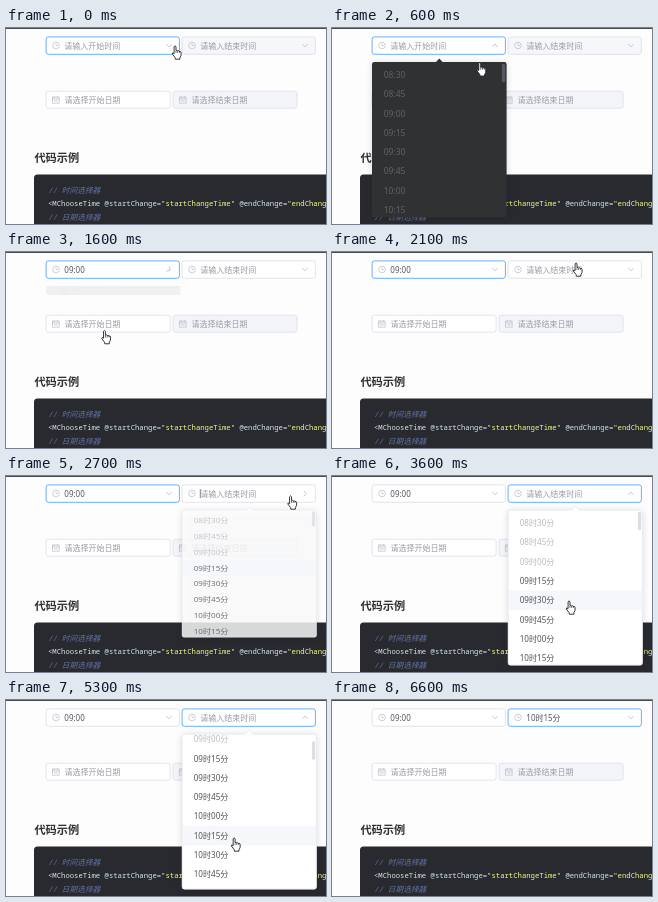
An HTML page with a canvas that plays this animation: 320x196 px, repeating every 6700 ms.

```html
<!DOCTYPE html>
<html lang="zh-CN">
<head>
<meta charset="utf-8">
<title>时间选择</title>
<style>
html, body { margin: 0; width: 100%; height: 100%; overflow: hidden; background: #fdfdfe; }
canvas { display: block; width: 320px; height: 196px; }
</style>
</head>
<body>
<canvas id="stage"></canvas>
<script>
const W = 320, H = 196, LOOP = 6700, STEP = 100;
const SANS = '"Noto Sans", "Noto Sans CJK SC", "Noto Sans CJK", sans-serif';
const MONO = '"Noto Sans Mono", "Noto Sans CJK SC", "Noto Sans CJK", monospace';
const BLUE = [64, 158, 255], GREY = [220, 223, 230];
const TEXT = '#606266', STRONG = '#535559', HINT = '#999ca2', FAINT = '#b9bcc4';
const ROW = 19.3, TOP = 33.9, BOTTOM = 189.3, BOX_W = 134.6;

const canvas = document.getElementById('stage');
const ctx = canvas.getContext('2d');
const dpr = window.devicePixelRatio || 1;
canvas.width = W * dpr;
canvas.height = H * dpr;

const clamp = v => Math.max(0, Math.min(1, v));
const span = (t, from, to) => clamp((t - from) / (to - from));
const quintOut = p => 1 - (1 - p) ** 5;
const quadOut = p => 1 - (1 - p) ** 2;
const smooth = p => p * p * (3 - 2 * p);
const mix = (a, b, p) => `rgb(${a.map((v, i) => Math.round(v + (b[i] - v) * p))})`;

// Pointer stops: time, left, top
const stops = [
  [0, 165.5, 17], [400, 165.5, 17], [1000, 83.3, 82], [1100, 83.3, 83],
  [1500, 83.3, 83], [2100, 240.5, 10], [2200, 240.5, 10], [2700, 281, 19],
  [2850, 281, 19], [3500, 233.5, 124], [3600, 233.5, 124], [4200, 232.5, 133],
  [4750, 232.5, 133], [5200, 224.6, 137], [5400, 224.6, 137], [6100, 216, 198],
  [LOOP, 216, 198]
];

function pointerAt(t) {
  const i = stops.findIndex(s => s[0] > t);
  const [t0, x0, y0] = stops[i - 1], [t1, x1, y1] = stops[i];
  const p = smooth(span(t, t0, t1));
  return { x: x0 + (x1 - x0) * p, y: y0 + (y1 - y0) * p };
}

function text(str, x, y, color, size = 8, font = SANS, style = '') {
  ctx.font = `${style} ${size}px ${font}`;
  ctx.fillStyle = color;
  ctx.fillText(str, x, y);
}

function roundRect(x, y, w, h, r, fill, stroke) {
  ctx.beginPath();
  ctx.roundRect(x, y, w, h, r);
  if (fill) { ctx.fillStyle = fill; ctx.fill(); }
  if (stroke) { ctx.strokeStyle = stroke; ctx.lineWidth = 0.8; ctx.stroke(); }
}

function line(points, color, width) {
  ctx.beginPath();
  points.forEach(([x, y]) => ctx.lineTo(x, y));
  ctx.strokeStyle = color;
  ctx.lineWidth = width;
  ctx.stroke();
}

function clock(x, y) {
  ctx.beginPath();
  ctx.arc(x, y, 3.3, 0, Math.PI * 2);
  ctx.strokeStyle = FAINT;
  ctx.lineWidth = 0.7;
  ctx.stroke();
  line([[x, y - 2], [x, y + 0.2], [x + 1.8, y + 0.2]], FAINT, 0.7);
}

function calendar(x, y) {
  ctx.strokeStyle = FAINT;
  ctx.lineWidth = 0.7;
  ctx.strokeRect(x - 3.3, y - 2.7, 6.6, 6);
  line([[x - 3.3, y - 0.8], [x + 3.3, y - 0.8]], FAINT, 0.7);
  for (const dx of [-1.6, 1.6]) line([[x + dx, y - 3.7], [x + dx, y - 2]], FAINT, 0.7);
  line([[x - 1.8, y + 1.1], [x + 1.8, y + 1.1]], FAINT, 0.7);
}

function chevron(x, y, turn) {
  ctx.save();
  ctx.translate(x, y);
  ctx.rotate(-Math.PI * turn);
  line([[-2.7, -1.3], [0, 1.4], [2.7, -1.3]], FAINT, 0.8);
  ctx.restore();
}

function select(x, { value, hint, focus, turn, disabled, caret }) {
  roundRect(x + 0.1, 8.9, 133.3, 17.4, 2.3, disabled ? '#f5f7fa' : '#fff', mix(GREY, BLUE, focus));
  clock(x + 10, 17.5);
  text(value || hint, x + 18.3, 20.5, value ? STRONG : HINT);
  if (caret) line([[x + 18.3, 13], [x + 18.3, 22]], '#555', 0.7);
  chevron(x + 123, 17.5, turn);
}

function dateInput(x, hint, disabled) {
  roundRect(x + 0.1, 63.2, 124, 17, 2.3, disabled ? '#f3f5fa' : '#fff', mix(GREY, BLUE, 0));
  calendar(x + 9.8, 71.8);
  text(hint, x + 18.4, 74.9, HINT);
}

function page() {
  ctx.fillStyle = '#fdfdfe';
  ctx.fillRect(0, 0, W, H);
  ctx.fillStyle = '#4a4b4e';
  ctx.fillRect(0, 0, W, 1);
  dateInput(40, '请选择开始日期', false);
  dateInput(167, '请选择结束日期', true);
  text('代码示例', 28.4, 134, '#303133', 11.2, SANS, 'bold');
  roundRect(28, 146.6, 310, 70, 3.5, '#282a2f');
  text('// 时间选择器', 42, 164.7, '#6272a4', 7.7, MONO, 'italic');
  text('// 日期选择器', 42, 191.7, '#6272a4', 7.7, MONO, 'italic');
  let x = 42;
  for (const [part, color] of [
    ['<MChooseTime @startChange=', '#d3e8ee'], ['"startChangeTime"', '#f1fa8c'],
    [' @endChange=', '#d3e8ee'], ['"endChangeTime"', '#f1fa8c']
  ]) {
    text(part, x, 178.4, color, 7.25, MONO);
    x += ctx.measureText(part).width;
  }
}

function timeLabel(i, chinese) {
  const min = 510 + i * 15;
  const hh = String(Math.floor(min / 60)).padStart(2, '0');
  const mm = String(min % 60).padStart(2, '0');
  return chinese ? `${hh}时${mm}分` : `${hh}:${mm}`;
}

function dropdown(x, show, { dark, hover, scroll = 0, disabled = 0 }) {
  if (show < 0.01) return;
  const fill = dark ? '#303133' : '#fff';
  const ink = dark ? TEXT : STRONG;
  ctx.save();
  ctx.globalAlpha = show;
  ctx.translate(0, TOP);
  ctx.scale(1, show);
  ctx.translate(0, -TOP);

  ctx.save();
  ctx.shadowColor = 'rgba(0,0,0,.14)';
  ctx.shadowBlur = 7 * dpr;
  ctx.shadowOffsetY = dpr;
  roundRect(x, TOP, BOX_W, BOTTOM - TOP, 2.3, fill);
  ctx.restore();
  if (!dark) roundRect(x + 0.2, TOP + 0.2, BOX_W - 0.4, BOTTOM - TOP - 0.4, 2.3, null, '#e4e7ed');
  const mid = x + BOX_W / 2;
  ctx.beginPath();
  ctx.moveTo(mid - 4, TOP + 0.8);
  ctx.lineTo(mid, TOP - 3.5);
  ctx.lineTo(mid + 4, TOP + 0.8);
  ctx.fillStyle = fill;
  ctx.fill();
  if (!dark) line([[mid - 4, TOP], [mid, TOP - 3.5], [mid + 4, TOP]], '#e4e7ed', 0.6);

  ctx.beginPath();
  ctx.rect(x + 0.4, TOP + 0.5, BOX_W - 0.8, BOTTOM - TOP - 1);
  ctx.clip();
  for (let i = 0; i < 12; i++) {
    const y = 47 + i * ROW - scroll;
    if (i === hover) {
      ctx.fillStyle = '#f5f7fa';
      ctx.fillRect(x, y - ROW / 2, BOX_W, ROW);
    }
    text(timeLabel(i, !dark), x + 11.7, y + 3, i < disabled ? FAINT : ink, dark ? 8.5 : 8.1);
  }
  roundRect(x + BOX_W - 4.7, 35.7 + scroll * 0.12, 3.3, 18.6, 1.6, dark ? '#55585e' : '#dcdee2');
  ctx.restore();
}

function hand({ x, y }) {
  ctx.save();
  ctx.translate(x, y);
  ctx.beginPath();
  ctx.moveTo(2.6, 8.6);
  ctx.lineTo(2.6, 1.7);
  ctx.quadraticCurveTo(3.5, 0, 4.5, 1.7);
  ctx.lineTo(4.5, 5.6);
  ctx.quadraticCurveTo(5.6, 4.8, 6.2, 6);
  ctx.quadraticCurveTo(7.3, 5.2, 8, 6.5);
  ctx.quadraticCurveTo(9.5, 6, 9.6, 7.6);
  ctx.lineTo(9.5, 10.6);
  ctx.lineTo(8.4, 12.6);
  ctx.lineTo(8.4, 14.2);
  ctx.lineTo(3.8, 14.2);
  ctx.lineTo(3.6, 12.6);
  ctx.lineTo(0.8, 9);
  ctx.quadraticCurveTo(0.7, 7, 2.6, 8.6);
  ctx.closePath();
  ctx.fillStyle = '#fff';
  ctx.fill();
  ctx.strokeStyle = '#222';
  ctx.lineWidth = 0.9;
  ctx.lineJoin = 'round';
  ctx.stroke();
  for (const dx of [4.5, 6.2, 8]) line([[dx, 6], [dx, 8]], '#222', 0.6);
  ctx.restore();
}

function rowUnder(y, scroll, first) {
  return y < TOP ? first : Math.floor((y - 47 + scroll) / ROW + 0.5);
}

// Eased progress of a panel that opens and later closes
const toggle = (t, open, close, ease) =>
  ease(span(t, open, open + 300)) * (1 - ease(span(t, close, close + 300)));

function draw(t) {
  ctx.setTransform(dpr, 0, 0, dpr, 0, 0);
  const pointer = pointerAt(t);
  const tip = pointer.y + 1;
  const scroll = 46.4 * quadOut(span(t, 4200, 4600));
  const start = [360, 1470], end = [2613, 5370];
  const swap = span(t, 2700, 2900);
  const caret = t > end[0] && t < end[1] && (t - 2600) % 1060 < 530;

  page();
  select(40, {
    value: t >= start[1] && timeLabel(2, false), hint: '请输入开始时间',
    focus: 1 - swap, turn: toggle(t, ...start, quadOut)
  });
  select(176, {
    value: t >= end[1] && timeLabel(7, true), hint: '请输入结束时间',
    focus: swap, turn: toggle(t, ...end, quadOut), disabled: t < start[1], caret
  });
  dropdown(40, toggle(t, ...start, quintOut), {
    dark: true, hover: t < start[1] ? rowUnder(tip, 0, 0) : 2
  });
  dropdown(176, toggle(t, ...end, quintOut), {
    hover: t < end[1] ? Math.max(3, rowUnder(tip, scroll, 3)) : 7, scroll, disabled: 3
  });
  hand(pointer);
}

function frame(now) {
  const t = now % LOOP;
  draw(Math.floor(t / STEP) * STEP);
  requestAnimationFrame(frame);
}
requestAnimationFrame(frame);
</script>
</body>
</html>
```
